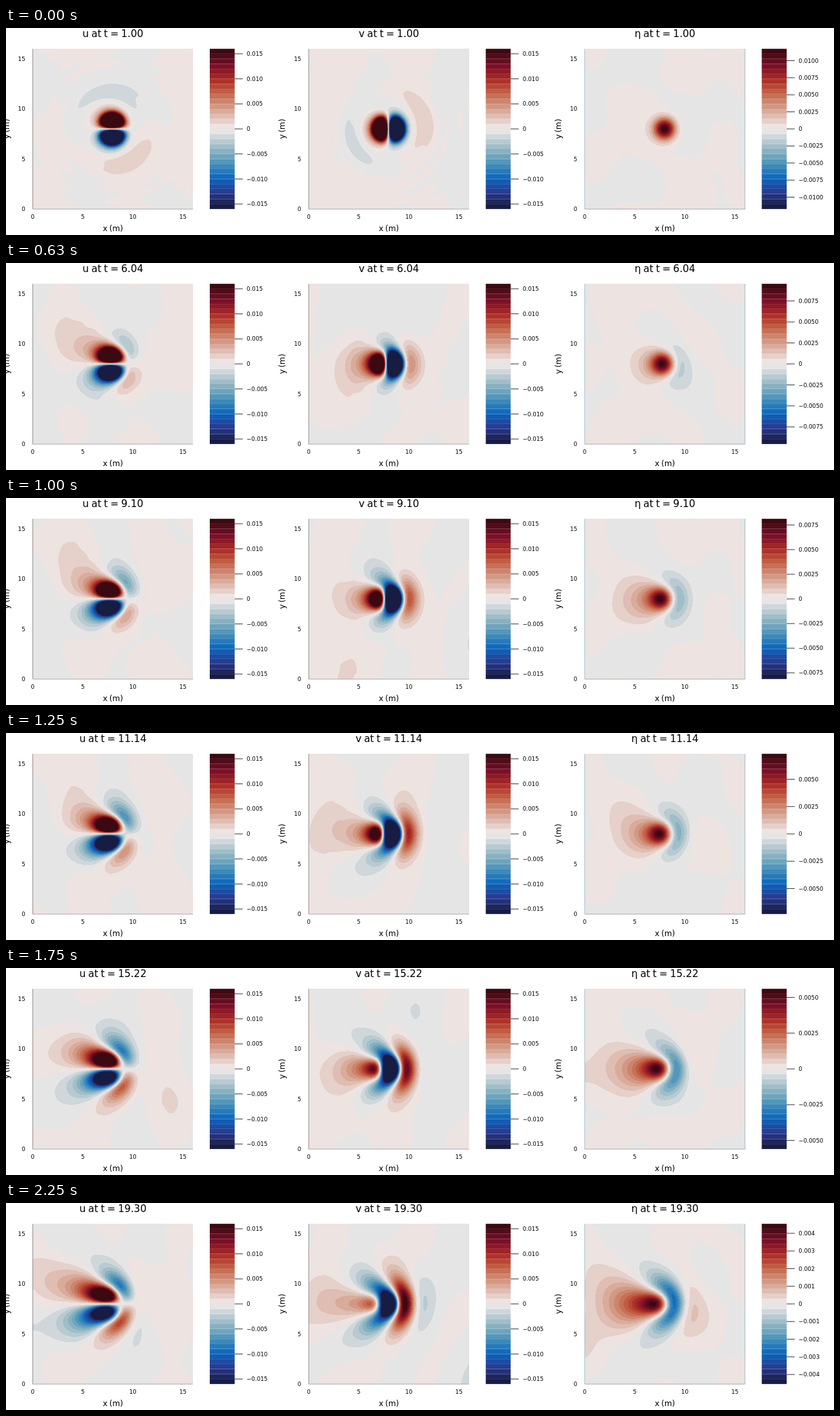
Animation of 1280 by 320 pixels, one loop 2.37 s. Source, as an HTML page with a canvas:

```html
<!DOCTYPE html>
<html lang="en">
<head>
<meta charset="utf-8">
<title>Rossby wave dispersion</title>
<style>
  html, body { margin: 0; width: 100%; height: 100%; overflow: hidden; background: #fff; }
  canvas { display: block; }
</style>
</head>
<body>
<canvas id="stage" width="1280" height="320"></canvas>
<script>
const ctx = document.getElementById('stage').getContext('2d');
const LOOP = 2370, SIZE = 248, PAD = SIZE + 2, TOP = 32.3, BOTTOM = 280, SCALE = 15.48;
const PITCH = 1280 / 3, FIRST_LEFT = 41.3, MIDDLE = 156, HALF_BAR = 123.84;
const VELOCITY_LIMIT = 0.016, BANDS = 32;

// Diverging palette, one colour per contour band
const STOPS = [
  [0, 23, 28, 66], [1 / 11, 41, 58, 143], [2 / 11, 11, 102, 189], [3 / 11, 69, 144, 185],
  [4 / 11, 142, 181, 194], [5 / 11, 210, 216, 219], [0.5, 241, 236, 235], [6 / 11, 230, 210, 204],
  [7 / 11, 213, 157, 137], [8 / 11, 196, 101, 72], [9 / 11, 172, 43, 36], [10 / 11, 120, 14, 40], [1, 60, 9, 17]
];
const palette = Array.from({ length: BANDS }, (_, band) => {
  const p = band / (BANDS - 1);
  const i = Math.min(STOPS.length - 2, STOPS.findLastIndex(s => s[0] <= p));
  const [a, b] = [STOPS[i], STOPS[i + 1]], f = (p - a[0]) / (b[0] - a[0]);
  return [1, 2, 3].map(c => Math.round(a[c] + (b[c] - a[c]) * f));
});

// Bessel function J0, tabulated from its integral
const J_STEP = 0.02;
const besselTable = Float64Array.from({ length: 5000 }, (_, i) => {
  let sum = 0;
  for (let k = 0; k < 80; k++) sum += Math.cos(i * J_STEP * Math.sin((k + 0.5) * Math.PI / 80));
  return sum / 80;
});
function bessel(x) {
  const p = x / J_STEP, i = p | 0;
  return besselTable[i] + (besselTable[i + 1] - besselTable[i]) * (p - i);
}

// A diffusing Gaussian high on a beta plane: each wavenumber shell drifts west at its own speed
const BETA = 0.23, INV_RADIUS_SQ = 0.6, VISCOSITY = 0.006, DK = 0.16;
const psi = new Float64Array(PAD * PAD);
const coord = i => (i - 0.5) / SCALE - 8;

function solve(t) {
  psi.fill(0);
  for (let K = DK / 2; K < 4.5; K += DK) {
    const weight = 0.5 * K * Math.exp(-K * K * (0.25 + VISCOSITY * t)) * DK;
    const drift = BETA * t / (K * K + INV_RADIUS_SQ);
    for (let row = 0; row < PAD / 2; row++) {
      const y2 = coord(row) ** 2;
      for (let col = 0; col < PAD; col++) {
        const x = coord(col) + drift;
        psi[row * PAD + col] += weight * bessel(K * Math.sqrt(x * x + y2));
      }
    }
  }
  for (let row = 0; row < PAD / 2; row++)
    psi.copyWithin((PAD - 1 - row) * PAD, row * PAD, (row + 1) * PAD);
}

let seed = 11;
const random = () => (seed = seed * 16807 % 2147483647) / 2147483647;
const ripples = [0, 1, 2].map(() => Array.from({ length: 5 }, () => ({
  kx: random() * 1.8 - 0.9, ky: random() * 1.8 - 0.9, speed: random() * 1.6 - 0.8, phase: random() * 6.28
})));
const ripple = (field, x, y, t) => ripples[field].reduce(
  (sum, w) => sum + Math.cos(w.kx * x + w.ky * y - w.speed * t + w.phase), 0);

// Early gravity wave running outward
function ring(x, y, t, angle) {
  const offset = (Math.hypot(x, y) - 2.6 - 1.2 * t) / 0.9;
  return 0.0015 / t * Math.exp(-offset * offset) * Math.cos(Math.atan2(y, x) - angle);
}

const seaLevelLimit = t => {
  const points = [[1, 0.01174], [4, 0.01077], [7.06, 0.00893], [11.14, 0.00733],
    [15.22, 0.0056], [17.26, 0.00488], [19.3, 0.00454]];
  const i = Math.max(1, points.findIndex(p => p[0] >= t - 1e-6));
  const [a, b] = [points[i - 1], points[i]];
  return a[1] + (b[1] - a[1]) * (t - a[0]) / (b[0] - a[0]);
};

const image = ctx.createImageData(SIZE, SIZE);

function drawField(field, left, t, limit) {
  const gradient = 0.068 * SCALE / 2;
  const peak = psi.reduce((m, v) => Math.max(m, v), 0);
  const calm = Math.min(1, t / 3);
  for (let row = 0; row < SIZE; row++) for (let col = 0; col < SIZE; col++) {
    const i = (row + 1) * PAD + col + 1, x = coord(col + 1), y = -coord(row + 1);
    let value = ripple(field, x, y, t) * calm;
    if (field === 2) {
      value = limit * (value * 0.013 + psi[i] / peak);
    } else {
      const slope = field ? psi[i + 1] - psi[i - 1] : psi[i + PAD] - psi[i - PAD];
      value = value * 0.00024 + gradient * slope;
      if (t < 4) value += field ? ring(x, y, t, 0.4) : -ring(x, y, t, 2);
    }
    const band = Math.floor((value / limit + 1) * BANDS / 2);
    const rgb = palette[Math.max(0, Math.min(BANDS - 1, band))];
    image.data.set([rgb[0], rgb[1], rgb[2], 255], (row * SIZE + col) * 4);
  }
  ctx.putImageData(image, Math.round(left), 32);
}

function text(string, x, y, size, align = 'center') {
  ctx.font = `${size}px "DejaVu Sans", sans-serif`;
  ctx.wordSpacing = '-1px';
  ctx.textAlign = align;
  ctx.fillStyle = '#000';
  ctx.fillText(string, x, y);
}

function line(x1, y1, x2, y2, color, width = 0.8) {
  ctx.strokeStyle = color;
  ctx.lineWidth = width;
  ctx.beginPath();
  ctx.moveTo(x1, y1);
  ctx.lineTo(x2, y2);
  ctx.stroke();
}

function drawAxes(left, field) {
  const right = left + 16 * SCALE;
  line(left, TOP, left, BOTTOM, field === 2 ? '#8fb5c8' : '#777');
  if (field === 2) line(right, TOP, right, BOTTOM, '#8fb5c8');
  line(left, BOTTOM, right, BOTTOM, '#999');
  for (let v = 0; v <= 15; v += 5) {
    text(v, left + v * SCALE, 294.7, 8.75);
    text(v, left - 11.6, BOTTOM - v * SCALE + 3.1, 8.75, 'right');
  }
  text('x (m)', left + 124, 314, 12.1);
  ctx.save();
  ctx.translate(left - 36.8, 156);
  ctx.rotate(-Math.PI / 2);
  text('y (m)', 0, 0, 12.1);
  ctx.restore();
}

function drawColorbar(left, limit) {
  const height = 2 * HALF_BAR / BANDS;
  palette.forEach((rgb, band) => {
    ctx.fillStyle = `rgb(${rgb})`;
    ctx.fillRect(left, MIDDLE + HALF_BAR - (band + 1) * height, 38.5, height);
  });
  const step = limit === VELOCITY_LIMIT ? 0.005 : limit < 0.005 ? 0.001 : 0.0025;
  const digits = step === 0.0025 ? 4 : 3, count = Math.floor(limit / step);
  for (let i = -count; i <= count; i++) {
    const y = MIDDLE - i * step / limit * HALF_BAR;
    line(left + 38.5, y, left + 51, y, '#000');
    const label = i ? (i < 0 ? '\u2212' : '') + Math.abs(i * step).toFixed(digits) : '0';
    text(label, left + 57, y + 3.1, 8.75, 'left');
  }
}

function draw(index) {
  const t = index < 4 ? index + 1 : 4 + 1.02 * (index - 3);
  solve(t);
  ctx.fillStyle = '#fff';
  ctx.fillRect(0, 0, 1280, 320);
  ['u', 'v', 'η'].forEach((name, field) => {
    const left = FIRST_LEFT + field * PITCH;
    const limit = field === 2 ? seaLevelLimit(t) : VELOCITY_LIMIT;
    drawField(field, left, t, limit);
    drawAxes(left, field);
    drawColorbar(left + 273.7, limit);
    text(`${name} at t = ${t.toFixed(2)}`, left + 124, 14, 15.4);
  });
}

let shown = -1;
function tick() {
  const index = Math.floor(Math.floor(performance.now() % LOOP / 10) / 12.5);
  if (index !== shown) draw(shown = index);
  requestAnimationFrame(tick);
}
tick();
</script>
</body>
</html>
```
